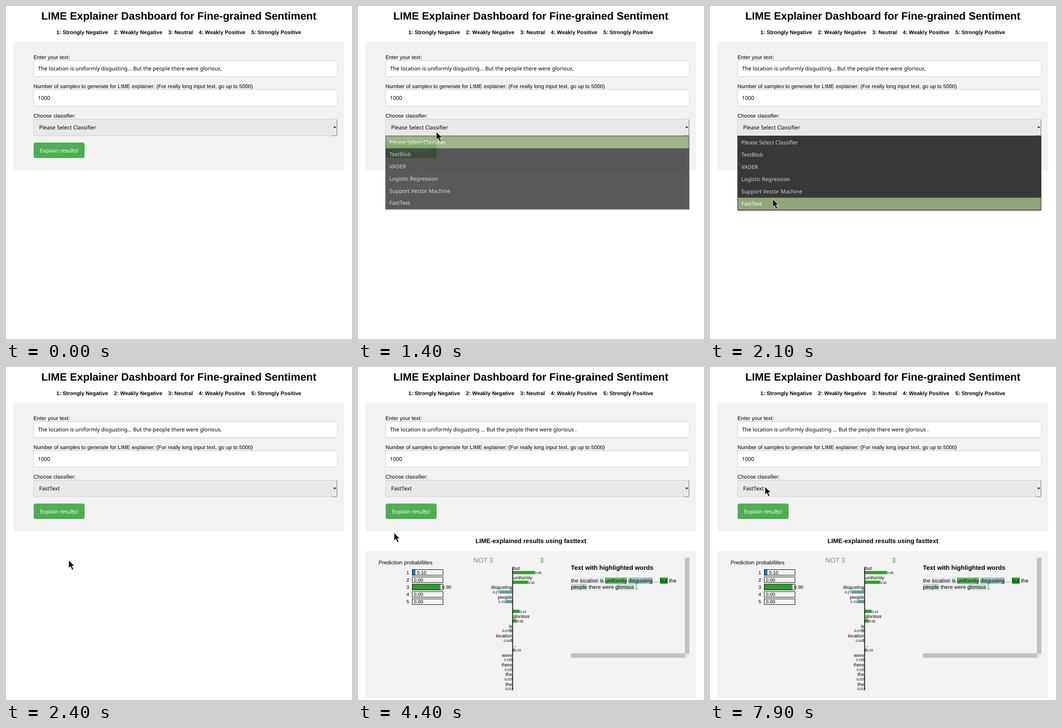
An HTML page for the animation above (8 s loop, 762 px wide and 734 px high).

```html
<!DOCTYPE html>
<html lang="en">
<head>
<meta charset="utf-8">
<title>Explainer dashboard</title>
<style>
  html, body { margin: 0; width: 100%; height: 100%; overflow: hidden; background: #fff; }
  svg { display: block; width: 762px; height: 734px; }
  text, .words { font-family: "Liberation Sans", Arial, sans-serif; text-rendering: geometricPrecision; }
  .ui { font-family: "Noto Sans", "Open Sans", sans-serif; }
  .bold { font-weight: bold; }
  .mid { text-anchor: middle; }
  .end { text-anchor: end; }
  .words { font-size: 11.8px; line-height: 14px; width: 245px; color: #000; }
</style>
</head>
<body>
<svg id="stage" viewBox="0 0 762 734"></svg>
<script>
const LOOP = 8000, STEP = 100;
const GREEN = '#2ca02c', TEAL = '#5f9ea0';
const OPEN = 1400, CLOSE = 2400, STATUS = 3500, RESULT = 4400;

const text = (x, y, str, size, cls = '', fill = '#000', id = '') =>
  `<text x="${x}" y="${y}" font-size="${size}" class="${cls}" fill="${fill}" id="${id}">${str}</text>`;
const rect = (x, y, w, h, fill, more = '') =>
  `<rect x="${x}" y="${y}" width="${w}" height="${h}" fill="${fill}" ${more}/>`;
const field = (y, h, fill) => rect(60.8, y, 668.7, h, fill, 'rx="3" stroke="#ccc"');

const scale = ['1: Strongly Negative', '2: Weakly Negative', '3: Neutral',
  '4: Weakly Positive', '5: Strongly Positive'].join('\u00a0'.repeat(4));
const choices = ['Please Select Classifier', 'TextBlob', 'VADER',
  'Logistic Regression', 'Support Vector Machine', 'FastText'];

function form() {
  return text(380.7, 30, 'LIME Explainer Dashboard for Fine-grained Sentiment', 23.6, 'bold mid')
    + text(380.5, 62, scale, 11.78, 'bold mid')
    + rect(16.5, 79, 728.3, 283, '#f2f2f2', 'rx="4"')
    + text(60.5, 117, 'Enter your text:', 11.8)
    + field(120.5, 35, '#fff') + text(70.5, 142, '', 11.78, 'ui', '#000', 'entry')
    + text(60.5, 181, 'Number of samples to generate for LIME explainer: (For really long input text, go up to 5000)', 11.8)
    + field(184.5, 36, '#fff') + text(70.2, 207, '1000', 11.9, 'ui')
    + text(60.5, 245.5, 'Choose classifier:', 11.8)
    + field(249.5, 36.5, '#e8e8e6') + text(73, 272, '', 11.87, 'ui', '#000', 'chosen')
    + rect(719, 250, 10, 36, '#eaeae8')
    + '<path d="M719.5 286V250.5H729" fill="none" stroke="#dededc"/>'
    + '<path d="M719 285.8H728.8V250" fill="none" stroke="#777"/>'
    + '<path d="M721 266H727L724 269.4Z"/>'
    + rect(61, 301, 112, 34, '#4caf50', 'rx="3.5"')
    + text(75, 323, 'Explain results!', 11.9, 'ui', '#fff');
}

function probabilities() {
  return text(45.4, 435, 'Prediction probabilities', 11.8)
    + [0.1, 0, 0.9, 0, 0].map((p, i) => {
      const y = 446.6 + i * 16.15, w = p * 69;
      return text(112.5, y + 10.2, i + 1, 10.5, 'end')
        + rect(119.5, y, w, 12.4, i ? GREEN : '#1f77b4')
        + rect(119.5, y, 67.8, 12.4, 'none', 'stroke="#000"')
        + text(123.1 + w, y + 10.2, p.toFixed(2), 10.5);
    }).join('');
}

const weights = [['but', 0.46], ['uniformly', 0.32], ['disgusting', -0.27], ['people', -0.15],
  ['.', 0.14], ['glorious', 0.08], ['is', -0.07], ['location', -0.04], ['...', 0.03],
  ['were', -0.03], ['there', -0.02], ['the', -0.02], ['the', -0.01]];

function chart() {
  const bars = weights.map(([word, v], i) => {
    const y = 446.6 + i * 21.35, w = Math.abs(v) * 105, num = Math.abs(v).toFixed(2);
    return v > 0
      ? text(341.8, y, word, 10.35) + rect(341, y + 3, w, 7, GREEN) + text(341.4 + w, y + 9.6, num, 7.4)
      : text(339.4, y, word, 10.35, 'end') + rect(340 - w, y + 3, w, 7, TEAL)
        + text(339.6 - w, y + 9.6, num, 7.4, 'end');
  }).join('');
  return text(254, 431, 'NOT 3', 14.8, '', TEAL) + text(400.4, 431, '3', 14.8, '', GREEN)
    + bars + rect(339.7, 441, 1.7, 271.5, '#000');
}

function highlighted() {
  const shade = (word) => {
    const hit = weights.find(([w]) => w === word);
    if (!hit || Math.abs(hit[1]) < 0.04) return word;
    const rgb = hit[1] > 0 ? '44,160,44' : '95,158,160';
    return `<span style="background:rgba(${rgb},${Math.abs(hit[1]) / 0.46})">${word}</span>`;
  };
  const lines = ['the location is uniformly disgusting ... but the', 'people there were glorious .'];
  return text(469, 447, 'Text with highlighted words', 13.8, 'bold')
    + '<foreignObject x="469" y="464" width="250" height="40"><div xmlns="http://www.w3.org/1999/xhtml" class="words">'
    + lines.map(l => l.split(' ').map(shade).join(' ')).join('<br/>') + '</div></foreignObject>'
    + rect(720, 420.5, 10, 210.5, '#c1c1c1') + rect(469, 631, 251, 10, '#c1c1c1')
    + rect(720, 631, 10, 10, '#e3e3e3');
}

const results = () => text(380.8, 388.3, 'LIME-explained results using fasttext', 13.82, 'bold mid')
  + rect(16.5, 405.8, 728.3, 324, '#f2f2f2', 'rx="4"') + probabilities() + chart() + highlighted();

const statusBar = () => '<path d="M0 720H273Q276 720 276 723V734H0Z" fill="#2f2f32"/>'
  + text(-5.5, 736, '127.0.0.1', 11.9, 'ui', '#e6e6e6');

function menu(t, y) {
  const opening = t < OPEN + STEP, h = opening ? 26.7 : 27.1;
  const active = Math.max(0, Math.min(5, Math.floor((y - 287) / h)));
  const rows = choices.map((c, i) => (i === active ? rect(61, 287 + i * h, 668, h, '#8fa876') : '')
    + text(69, 304.7 + i * h, c, 11.87, 'ui', i === active ? '#fff' : '#d3d3d3')).join('');
  return `<g opacity="${opening ? 0.83 : 1}">` + rect(61, 288, 668.5, h * 6 + 1.5, '#000', 'opacity=".3"')
    + rect(61, 286.5, 668, h * 6 + 0.5, '#383838') + rows
    + rect(60.9, 286.4, 668.2, h * 6 + 0.6, 'none', 'stroke="#222"') + '</g>';
}

const BEAM = 'M-3.5 -8.5Q0 -8.5 0 -6.5V6.5Q0 8.5 -3.5 8.5M3.5 -8.5Q0 -8.5 0 -6.5M0 6.5Q0 8.5 3.5 8.5';
const pointers = {
  arrow: '<path d="M0 0V17.3L4.1 13.8L7.4 21.2L10.6 19.8L7.4 12.6L12.8 12.2Z" fill="#111" stroke="#fff" stroke-width=".9"/>',
  hand: '<path d="M3.4 2.2Q3.4 .2 5.4 .2T7.4 2.2V6L13.6 7Q16.6 7.8 16.4 10.6L15.6 18.6H5.6L4.6 15L.4 11.8Q-.6 9 1.6 8.4L3.8 9.4Z" fill="#000" stroke="#fff"/>'
    + '<path d="M6.6 15.6H14.8" stroke="#fff" stroke-width=".8"/>',
  beam: `<path d="${BEAM}" fill="none" stroke="#fff" stroke-width="2.6"/>`
    + `<path d="${BEAM}" fill="none" stroke="#111" stroke-width="1.2"/>`
};

// time, x, y, pointer; 'glide' eases to the next stop, all others hold
const stops = [
  [200, 362, 2, 'glide'], [1000, 170, 295], [1100, 170.5, 284], [1200, 172.5, 277.5],
  [1500, 172.5, 277.5, 'glide'], [2100, 138, 426],
  [3000, 134, 372], [3100, 132.8, 327, 'hand'], [3300, 132.8, 326, 'hand'],
  [3500, 132.8, 324.8, 'hand'], [3700, 132.8, 324, 'hand'],
  [3900, 98, 359], [4200, 79, 364], [4400, 79.3, 365.5], [4600, 76, 367.5], [5100, 74, 368],
  [5300, 71, 376.5], [5500, 66.2, 383], [7000, 66.8, 383], [7200, 66.5, 312, 'hand'],
  [7300, 70.5, 239.5, 'beam'], [7500, 90.5, 236.5, 'beam'], [7700, 118.8, 249.5], [7900, 121, 264]
];
// text bands crossed on the way in
const bands = [[8, 36], [50, 65], [120, 156], [170, 183], [184, 220]];

function pointerAt(t) {
  const i = stops.findLastIndex(s => t >= s[0]);
  if (i < 0) return null;
  let [start, x, y, kind = 'arrow'] = stops[i];
  if (kind === 'glide') {
    const [end, x2, y2] = stops[i + 1];
    const u = (t - start) / (end - start);
    const e = 0.6 * u * (2 - u) + 0.4 * u * u * (3 - 2 * u);
    x += (x2 - x) * e;
    y += (y2 - y) * e;
    kind = bands.some(([a, b]) => y >= a && y <= b) ? 'beam' : 'arrow';
  }
  return { x, y, kind };
}

const stage = document.getElementById('stage');
stage.innerHTML = form() + `<g id="results">${results()}</g><g id="status">${statusBar()}</g>`
  + '<g id="menu"></g><g id="pointer"></g>';
const el = id => document.getElementById(id);
const show = (id, on) => el(id).setAttribute('display', on ? 'inline' : 'none');

let last = -1;
function draw(now) {
  const t = Math.floor((now % LOOP) / STEP) * STEP;
  if (t === last) return;
  last = t;
  const p = pointerAt(t), gap = t >= RESULT ? ' ' : '';
  el('entry').textContent = `The location is uniformly disgusting${gap}... But the people there were glorious${gap}.`;
  el('chosen').textContent = choices[t >= CLOSE ? 5 : 0];
  show('results', t >= RESULT);
  show('status', t >= STATUS && t < RESULT);
  el('menu').innerHTML = t >= OPEN && t < CLOSE ? menu(t, p.y) : '';
  el('pointer').innerHTML = p ? `<g transform="translate(${p.x} ${p.y})">${pointers[p.kind]}</g>` : '';
}

const origin = performance.now();
function tick() {
  draw(performance.now() - origin);
  requestAnimationFrame(tick);
}
tick();
</script>
</body>
</html>
```
